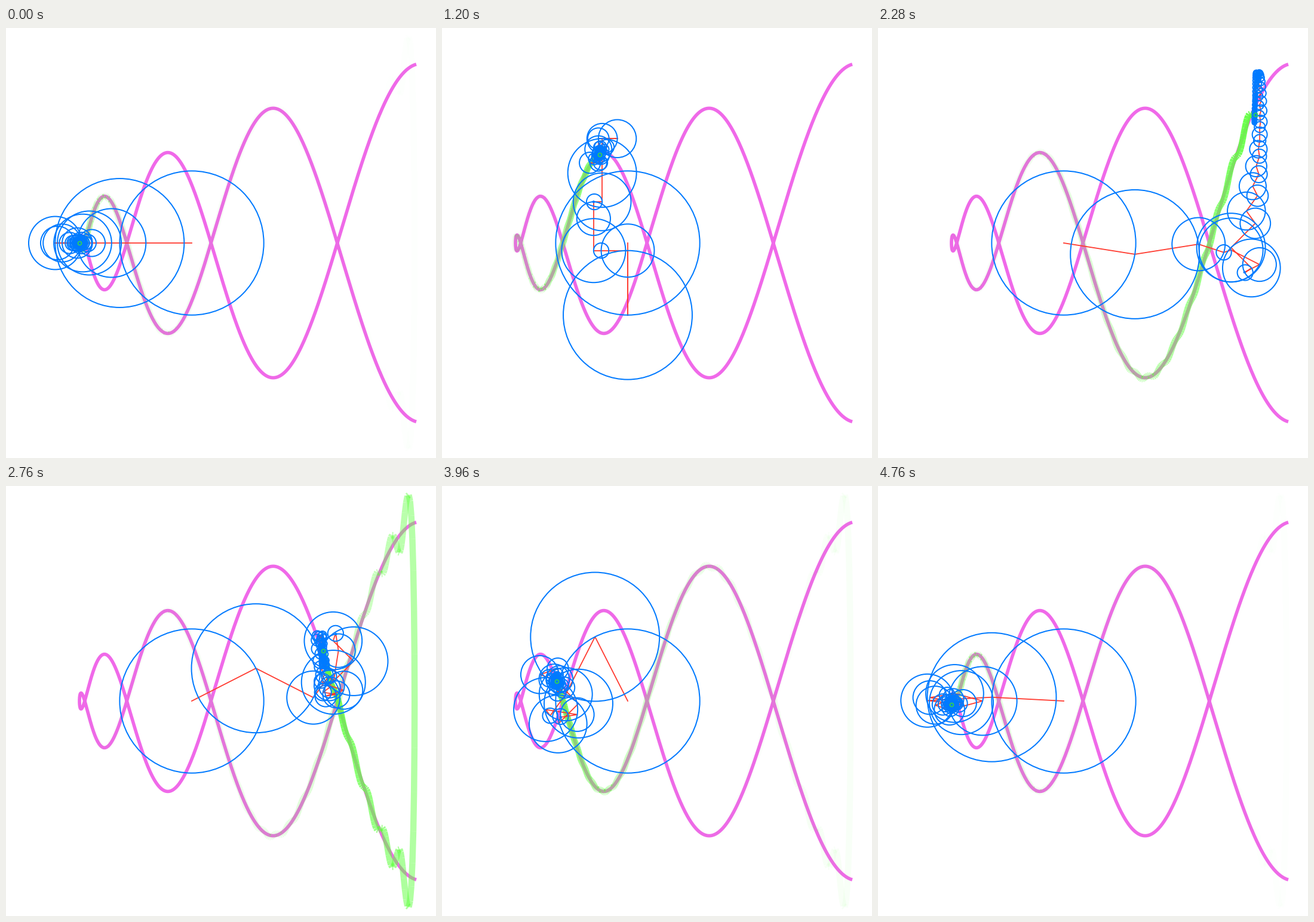
Recreate the animation shown at these times as a matplotlib script. Size 720x720 px, loop 4.8 s.

```python
import numpy as np
import matplotlib.pyplot as plt
from matplotlib.animation import FuncAnimation
from matplotlib.collections import EllipseCollection, LineCollection

SIZE = 720
DPI = 72               # one point equals one pixel
FRAMES = 120
INTERVAL = 40
HARMONICS = 80
STEPS = 10             # trail samples per frame
TRAIL = 780            # trail samples kept

LEFT, MID = 123, 360
WIDTH, HEIGHT = 564, 299.2

PINK = "#f069e9"
GREEN = "#60ff40"
RED = "#ff3b30"
BLUE = "#007aff"
TIP = "#2fd058"


def shape(u):
    """Curve for u in [-1, 1]: a parabola in x, a growing cosine in y."""
    return LEFT + WIDTH * u**2 + 1j * (MID + HEIGHT * u * np.cos(4 * np.pi * u))


def coefficients():
    """Exact Fourier terms, ordered 1, -1, 2, -2, ..."""
    freqs, terms = [], []
    for n in range(1, HARMONICS + 1):
        sign = (-1) ** n
        x = 2 * WIDTH * sign / (np.pi * n) ** 2
        resonance = 0 if n == 4 else 1 / (n - 4)
        y = -HEIGHT * sign / (2 * np.pi) * (1 / (n + 4) + resonance)
        freqs += [n, -n]
        terms += [x + y, x - y]
    return np.array(freqs), np.array(terms)


def points(z):
    return np.column_stack([z.real, z.imag])


freqs, terms = coefficients()
center = LEFT + WIDTH / 3 + 1j * MID


def joints(t):
    arms = terms * np.exp(2j * np.pi * freqs * t)
    return center + np.concatenate([[0], np.cumsum(arms)])


samples = FRAMES * STEPS
phase = np.arange(samples) / samples
path = points(center + np.exp(2j * np.pi * np.outer(phase, freqs)) @ terms)

fig = plt.figure(figsize=(SIZE / DPI, SIZE / DPI), dpi=DPI, facecolor="white")
ax = fig.add_axes([0, 0, 1, 1])
ax.set_xlim(0, SIZE)
ax.set_ylim(0, SIZE)
ax.axis("off")

curve = shape(np.linspace(-1, 1, 1200))
ax.plot(curve.real, curve.imag, color=PINK, lw=5.6, solid_capstyle="butt", zorder=1)

age = np.arange(TRAIL, 0, -1) / samples
fade = [plt.matplotlib.colors.to_rgba(GREEN, a) for a in np.exp(-10 * age)]
trail = LineCollection([], colors=fade, linewidths=10.5, capstyle="butt", zorder=2)
ax.add_collection(trail, autolim=False)

arm, = ax.plot([], [], color=RED, lw=1.8, zorder=3)

sizes = 2 * np.abs(terms)
circles = EllipseCollection(
    sizes, sizes, np.zeros(len(sizes)), units="xy",
    offsets=np.zeros((len(sizes), 2)), offset_transform=ax.transData,
    facecolors="none", edgecolors=BLUE, linewidths=2, zorder=4)
ax.add_collection(circles, autolim=False)

tip, = ax.plot([], [], "o", ms=6, mfc="none", mec=TIP, mew=1.8, zorder=5)


def update(i):
    z = joints(i / FRAMES)
    arm.set_data(z.real, z.imag)
    circles.set_offsets(points(z[:-1]))
    tip.set_data([z[-1].real], [z[-1].imag])
    recent = path[(i * STEPS + np.arange(-TRAIL, 1)) % samples]
    trail.set_segments(np.stack([recent[:-1], recent[1:]], axis=1))
    return trail, arm, circles, tip


anim = FuncAnimation(fig, update, frames=FRAMES, interval=INTERVAL,
                     repeat=True, repeat_delay=0)
plt.show()
```
